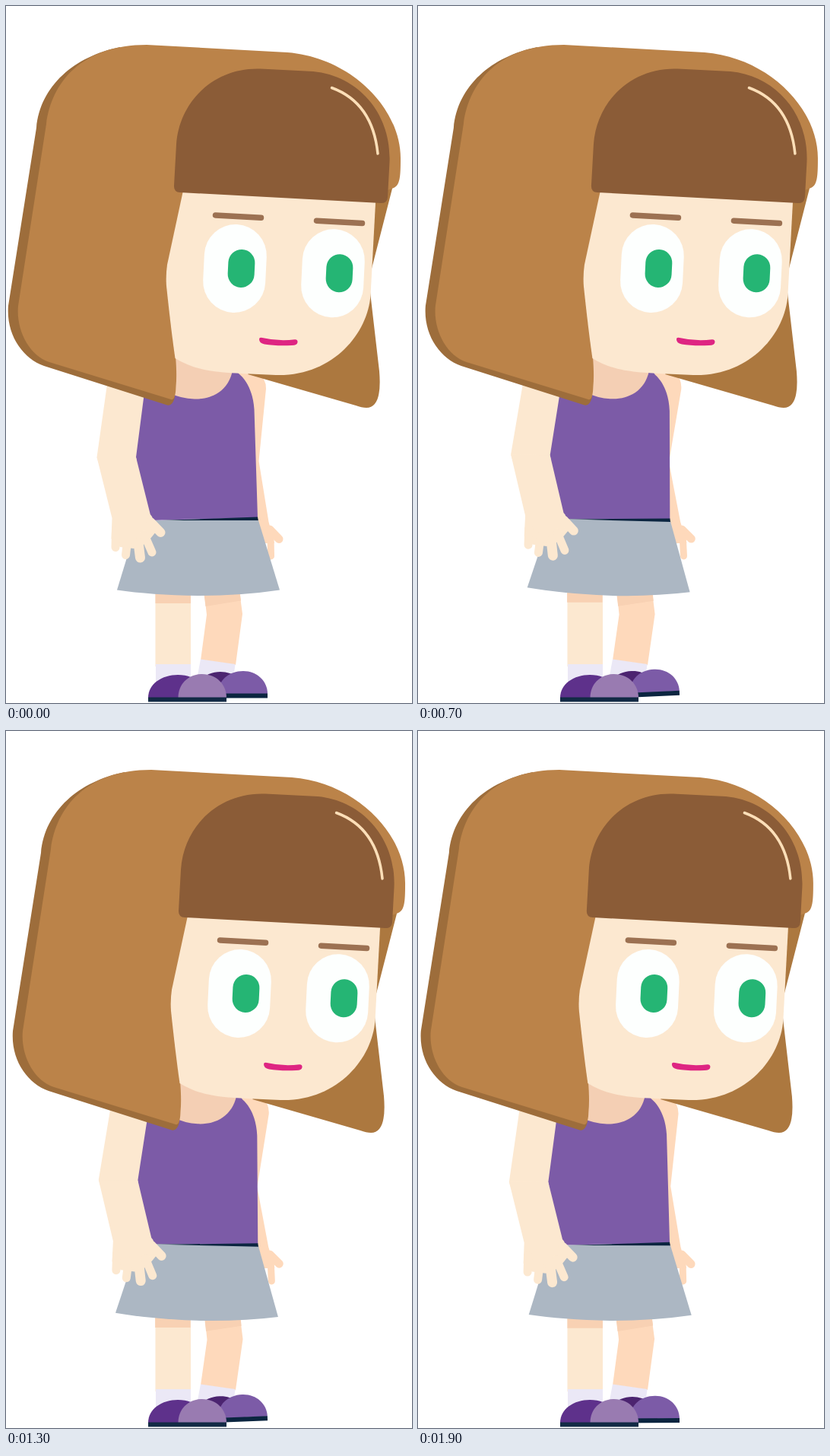
Animation, 534 px wide and 916 px high, one loop 2000 ms. Source, as an HTML page:

```html
<!DOCTYPE html>
<html lang="en">
<head>
<meta charset="utf-8">
<title>Swaying girl</title>
<style>
  @property --lean { syntax: '<number>'; inherits: true; initial-value: 0; }

  html, body { margin: 0; width: 100%; height: 100%; overflow: hidden; background: #fff; }
  svg { display: block; width: 100%; height: 100%; animation: sway 2s infinite; }

  /* held poses, one every 100 ms */
  @keyframes sway {
    0%   { --lean: 0; animation-timing-function: steps(9); }
    45%  { --lean: 1; animation-timing-function: steps(1); }
    50%  { --lean: .967; animation-timing-function: steps(10); }
    100% { --lean: 0; }
  }

  .turn { transform: rotate(calc(var(--lean) * var(--angle))); }
  .body { --angle: 2.1deg; transform-origin: 258px 685px; }
  .forearm { --angle: -1.1deg; transform-origin: 145px 593px; }
  .far-arm { --angle: 5deg; transform-origin: 337px 566px; }
  .far-forearm { --angle: -2.2deg; transform-origin: 345px 690px; }
  .far-leg { --angle: .7deg; transform-origin: 279px 862px; }
  .far-shoe { --angle: -3.4deg; transform-origin: 262px 906px; }
  .thigh { transform: translate(calc(var(--lean) * -.5px), calc(var(--lean) * -1.5px)); }
  .head { transform: translateX(calc(var(--lean) * 8.9px)); }

  .skin { fill: #fce8d0; }
  .far-skin { fill: #fed9bb; }
  .shade { fill: #f8d1b3; }
  .sock { fill: #ebe8f6; }
  .purple { fill: #7c5ba7; }
  .navy { fill: #0b2540; }
  .hair { fill: #bb8349; }
  .eye { fill: #fdfffe; }
  .iris { fill: #25b574; }
  .line { fill: none; stroke-linecap: round; }
</style>
</head>
<body>
<svg viewBox="0 0 534 916">
  <!-- far arm -->
  <path class="turn far-arm far-skin" d="M303 480L332 484Q342 489 342 503L332.5 598L322 598L312 500Z"/>
  <g class="turn far-forearm">
    <path class="far-skin" d="M320 590L332.5 598L345.5 678L353 706L335 706Z"/>
    <g class="line" stroke="#fed9bb">
      <path stroke-width="11" d="M347 688L359 700.5"/>
      <path stroke-width="9" d="M348 698L348.5 723"/>
    </g>
  </g>

  <!-- legs -->
  <g class="turn far-leg">
    <path class="far-skin" d="M260 765H306.5L311 799L302 866L256 860L264 800Z"/>
    <path class="shade" d="M259.5 765H307L309 781.5L262.5 789Z"/>
  </g>
  <path class="sock" d="M256 858.5L301.5 865L299 885H251Z"/>
  <g class="turn far-shoe">
    <path fill="#4c2470" d="M246 904C250 884 266 875 282 875C300 875 312 886 315 904Z"/>
    <path class="purple" d="M279 904C279 886 293 874 312 874C330 874 344 887 344 904Z"/>
    <path class="navy" d="M262 903.5H344V909.5H262Z"/>
  </g>
  <path class="skin" d="M196.5 765H243V868H196.5Z"/>
  <path class="shade thigh" d="M196.5 765H243V785H196.5Z"/>
  <path class="sock" d="M197 865H243V890H197Z"/>
  <path fill="#5e318b" d="M187 909C187 891 205 879 226 879C247 879 262 891 262 909Z"/>
  <path fill="#997bb1" d="M226.5 909C226.5 891 240 878 258 878C277 878 290 892 290 909Z"/>
  <path fill="#122a45" d="M187 908.5H290V914.5H187Z"/>

  <!-- body -->
  <g class="turn body">
    <path class="purple" d="M175 495L165 593L190 676L331 672.5L326.5 530C325 508 317 492 306 483L297 470H200Z"/>
    <path fill="#f4cfb4" d="M210 450L300 470L297 483C291 505 272 517 248 516.5Q228 516 210 506Z"/>
    <path class="navy" d="M190 676.5L331 671.5L332 677H190Z"/>
    <path fill="#acb7c3" d="M174 676H332L360 767.5Q310 775 253 775Q190 774 146 767.5Z"/>
    <path class="skin" d="M134 490L119.5 593L122 601L172 598L171 593L183 500Z"/>
    <g class="turn forearm">
      <path class="skin" d="M119.5 593L139.5 673L138.5 700L150 711L168 713L185 706L198 690L192 671Q189 668 189 665L171 593Z"/>
      <g class="line" stroke="#fce8d0">
        <path stroke-width="11" d="M144.5 690L144 711.5"/>
        <path stroke-width="11" d="M160 700L157.5 721.5"/>
        <path stroke-width="13" d="M174 705L176.5 725"/>
        <path stroke-width="11" d="M182 695L192 718"/>
        <path stroke-width="12" d="M190 678L203.5 692"/>
      </g>
    </g>
  </g>

  <!-- head -->
  <g class="head">
    <path fill="#ac783f" d="M509 236L481 345Q477 362 480 385L491 480Q495 528 474 528Q468 528 460 525L318 484L400 400L480 230Z"/>
    <path fill="#9d6d3b" d="M150 54C90 66 45 105 40 160L3 394C0 432 22 463 50 473L212 524.5Q219 526 222 514Z"/>
    <path class="hair" d="M185 51L370 61C455 68 519 135 519 200C519 226 518 235 510 239L480 250H300L223 460Q225 485 223.5 500Q223 519 217 517L57 468C30 459 13 425 16 394L53 155C60 100 100 51 185 51Z"/>
    <path class="skin" d="M234 238L212 340Q210 354 211 368Q217 425 222.5 463C250 480 280 481.5 310 483L355 485C430 487 476 430 479.5 380L486.5 250Z"/>
    <path fill="#8b5c37" d="M229 245Q220.5 244.5 221 236L224 182C228 124 275 80 335 82.5L404 86C465 92 507 143 504.5 205L502 251Q501.5 259.5 493 259Z"/>
    <path class="line" stroke="#fddfb8" stroke-width="3.5" d="M428.5 107.5C468 122 485 155 489 194"/>
    <path class="line" stroke="#9c7152" stroke-width="7.5" d="M275.5 275L335.5 278.3M408.5 282.3L468.5 285.5"/>
    <g id="eye" transform="translate(301 345) rotate(2.8)">
      <rect class="eye" x="-41" y="-58" width="82" height="116" rx="41"/>
      <rect class="iris" x="-9" y="-25.5" width="35" height="50" rx="17.5"/>
    </g>
    <use href="#eye" x="129" y="6.3"/>
    <path fill="#de2582" d="M333 438Q333 435 337 436Q358 441 380 438.3Q384 438.5 383.5 442Q383 446 376 446Q355 447 340 444.5Q333 443 333 438Z"/>
  </g>
</svg>
</body>
</html>
```
